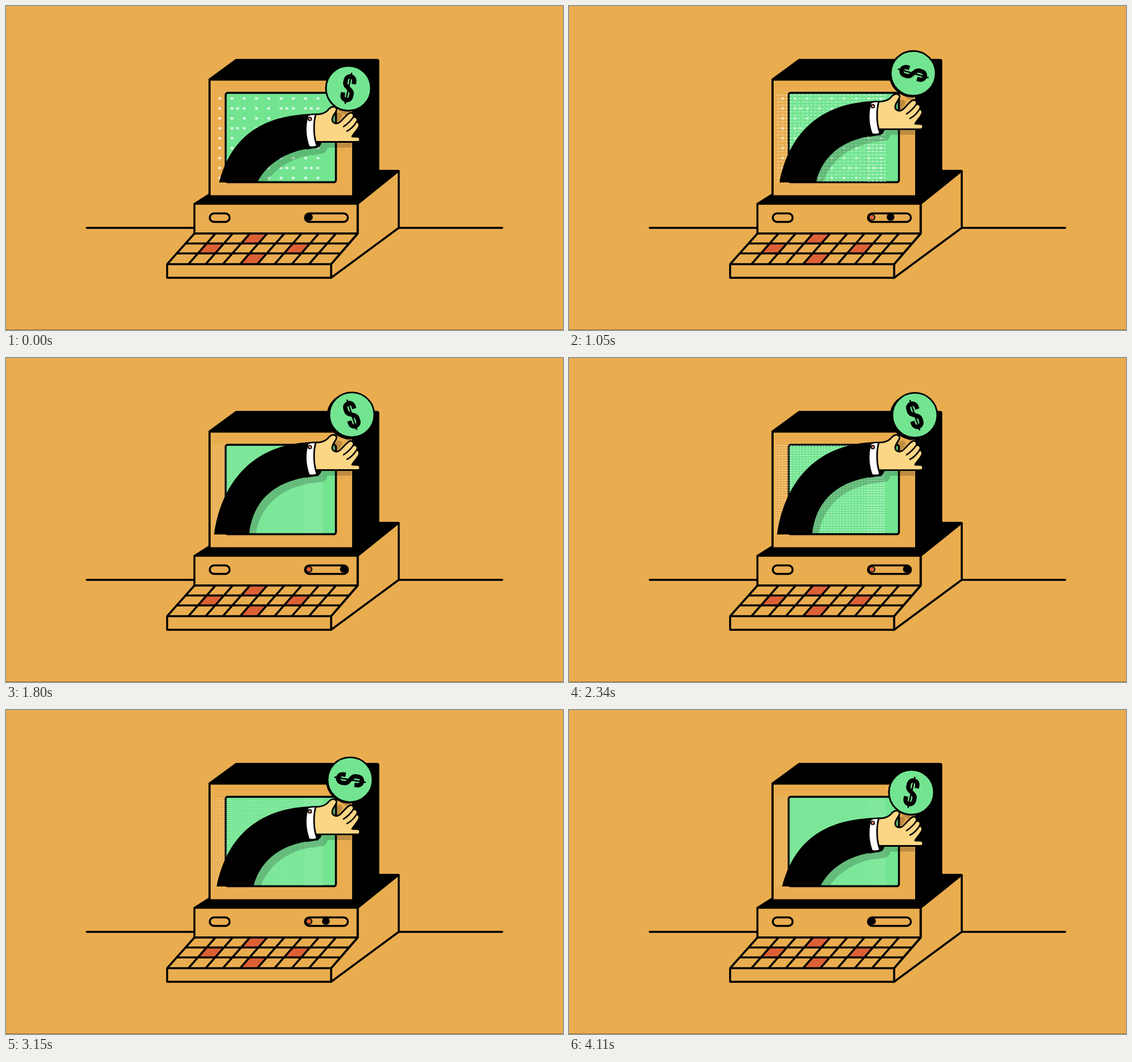
An HTML page for the animation above (4.14 s loop, 980 by 571 pixels).

```html
<!DOCTYPE html>
<html lang="en">
<head>
<meta charset="utf-8">
<title>Computer payment</title>
<style>
  html, body { margin: 0; width: 100%; height: 100%; overflow: hidden; background: #e9ad4f; }
  svg { display: block; width: 980px; height: 571px; }
  .line { fill: none; stroke: #000; stroke-width: 3.5; stroke-linecap: round; stroke-linejoin: round; }
  .face { fill: #e9ad4f; }
  .green { fill: #73e591; }
  .red { fill: #dd6035; }
  .skin { fill: #fbd684; }
  .dash { fill: none; stroke: #fff; }
</style>
</head>
<body>
<svg viewBox="0 0 980 571">
  <defs>
    <clipPath id="front"><path d="M360 132H608V310H360Z"/></clipPath>
    <clipPath id="dots"><path d="M363 153H557V310H363Z"/></clipPath>
    <clipPath id="band"><path d="M524 154H557V310H524Z"/></clipPath>
    <path id="palm" d="M545 191C553 191 561 189 566 184C571 177 579 175 581.500 181C583 186 575 191 574 199C573 207 582 209 587 205C593 200 599 191 605 188.500C610 187 613 191 611 196C616 194 620 199 617 204C622 205 623 211 619 216C615 222 611 226 609 230L619 230.500C624 231 624 239 619 239.500L545 239.500C541 225 541 205 545 191Z"/>
    <path id="sleeve" d="M528 192L545 190V238H556Q554 249 546 250L528 253Z"/>
  </defs>

  <rect y="570" width="980" height="1" fill="#8a6d3c"/>
  <path class="line" d="M142 391H331M691 391H873"/>

  <!-- monitor and base -->
  <path class="line" style="fill:#000" d="M358 129.500L405 95H653Q655 95 655 97V290.500H690L618 348.500H332L358 332Z"/>
  <path class="face" d="M360 131.500H609V333.500H360Z"/>
  <path class="line face" d="M619 348.500L691 290.500V391L572 479V455L619 401Z"/>
  <path class="line face" d="M331.500 348.500H618.500V401H331.500Z"/>
  <rect class="line" x="358.500" y="365.500" width="35" height="15" rx="7.500"/>
  <rect class="line" x="526" y="365.500" width="75.500" height="15" rx="7.500"/>
  <circle class="red" cx="533" cy="372.500" r="5" stroke="#000" stroke-width="2"/>
  <circle id="knob" cy="372" r="6.800"/>

  <!-- keyboard -->
  <path class="face" d="M331.500 401H618.500L572 455V479H283.500V455Z"/>
  <g id="reds" class="red"></g>
  <path id="keys" class="line"/>
  <path class="line" d="M331.500 401H618.500L572 455H283.500ZM283.500 455V479H572V455"/>

  <!-- screen -->
  <rect class="line green" style="fill:#73e591" x="386.500" y="153" width="194" height="157.500" rx="3.500"/>
  <g clip-path="url(#dots)">
    <path id="bold" class="dash" stroke-width="4" stroke-dasharray="5 16.600"/>
    <path id="extra" class="dash" stroke-width="4"/>
    <path id="fine" class="dash"/>
    <path id="dense" class="dash" clip-path="url(#band)"/>
  </g>

  <g clip-path="url(#front)">
    <g opacity=".19" transform="translate(10 10)">
      <path id="armShade"/>
      <g class="lift"><use href="#palm"/><use href="#sleeve"/></g>
      <circle class="coinAt" r="40"/>
    </g>
  </g>

  <!-- arm, coin and hand -->
  <path id="arm"/>
  <circle id="coinBack" r="41"/>
  <g class="coinAt">
    <circle class="green" r="39.500" stroke="#000" stroke-width="2.800"/>
    <g id="dollar" fill="none" stroke="#000">
      <path stroke-width="7.600" d="M7.500 -9V-13C7.500 -24 -7.500 -24 -7.500 -13V-9C-7.500 0 7.500 0 7.500 9V13C7.500 24 -7.500 24 -7.500 13V9"/>
      <path stroke-width="2.600" d="M0 -28V28"/>
    </g>
  </g>
  <g class="lift">
    <use href="#sleeve"/>
    <path d="M531 193Q537 190 546 191Q539 220 547 247Q540 250 533 248Q523 220 531 193Z" fill="#fff" stroke="#000" stroke-width="2.500"/>
    <use href="#palm" class="skin" stroke="#000" stroke-width="2.800" stroke-linejoin="round"/>
    <path class="line" style="stroke-width:2.600" d="M611 196C606 203 601 208 594 212.500M617 204C612 212 607 217 600 220.500"/>
    <circle class="red" cx="534.500" cy="199" r="3" style="fill:#dd8070" stroke="#000" stroke-width="1.700"/>
  </g>
</svg>
<script>
const LOOP = 4140, COL = 21.6, ROW = 17.5;
const $ = id => document.getElementById(id);
const all = (sel, fn) => document.querySelectorAll(sel).forEach(fn);
const set = (id, attrs) => { for (const k in attrs) $(id).setAttribute(k, attrs[k]); };
const mix = (a, b, k) => a + (b - a) * k;

// keyboard: sheared grid, first key wider than the rest
const rowY = [401, 418.5, 436, 455];
const keyX = (k, y) => 368.5 + 30.3 * k - (y - 401) * 0.88;
let lines = 'M316 418.500H603M300.500 436H588';
for (let k = 0; k < 8; k++) lines += `M${keyX(k, 401)} 401L${keyX(k, 455)} 455`;
set('keys', { d: lines });
$('reds').innerHTML = [[0, 2], [1, 0], [1, 5], [2, 3]].map(([r, k]) => {
  const a = rowY[r], b = rowY[r + 1];
  return `<path d="M${keyX(k, a)} ${a}H${keyX(k + 1, a)}L${keyX(k + 1, b)} ${b}H${keyX(k, b)}Z"/>`;
}).join('');

// screen dashes: rows of a grid split into n parts per cell
function rows(n) {
  let d = '';
  for (let y = 163 - ROW; y < 312; y += ROW / n) d += `M351.900 ${y.toFixed(2)}H575`;
  return d;
}
set('bold', { d: rows(1) });
set('extra', {
  d: [1, 3, 7].map(r => [405, 491.500, 534.500].map(x => `M${x} ${163 + r * ROW}h5`).join('')).join('')
});

// time, splits per cell, fine alpha, bold alpha, band alpha
const looks = [
  [0, 1, 0, 0.75, 0], [600, 7, 0.38, 0, 0.1], [1050, 3, 0.42, 0.5, 0.3], [1800, 7, 0.35, 0, 0.2],
  [2340, 4, 0.5, 0, 0.3], [3150, 5, 0.42, 0, 0.25], [LOOP, 7, 0.35, 0, 0.1]
];
let lastN = 0;
function drawDots(t) {
  const i = looks.findIndex(l => l[0] > t), a = looks[i - 1], b = looks[i];
  const k = (t - a[0]) / (b[0] - a[0]);
  const [, split, fine, bold, band] = a.map((v, j) => mix(v, b[j], k));
  const n = Math.round(split);
  if (n !== lastN) {
    const pitch = COL / n, w = Math.min(5, pitch * 0.6), h = Math.min(4, ROW / n * 0.32), d = rows(n);
    set('fine', { d, 'stroke-width': h, 'stroke-dasharray': `${w} ${pitch - w}` });
    set('dense', { d, 'stroke-width': h, 'stroke-dasharray': `${pitch * 0.85} ${pitch * 0.15}` });
    lastN = n;
  }
  set('fine', { opacity: fine });
  set('dense', { opacity: band });
  set('bold', { opacity: bold });
  set('extra', { opacity: bold });
}

// low and raised arm: outer edge upward, then inner edge back down
const low = [375, 311, 395, 235, 445, 192, 541, 190, 548, 250, 500, 252, 460, 275, 442, 311];
const high = [366, 311, 378, 225, 430, 150, 541, 148, 550, 208, 475, 212, 434, 250, 428, 311];
function armPath(k) {
  const v = low.map((n, i) => mix(n, high[i], k).toFixed(2));
  return `M${v.slice(0, 2)}C${v.slice(2, 8)}L${v.slice(8, 10)}C${v.slice(10)}Z`;
}

function draw(t) {
  const a = t / LOOP * 2 * Math.PI;
  const p = (1 - Math.cos(a)) / 2;
  const dy = -43.8 * p;
  const x = 602.5 + 6.2 * p;
  const y = 199 + dy - 56 + 1.2 * Math.cos(a) - Math.sin(a) + 0.8 * Math.cos(2 * a);
  const d = armPath(p / 0.959);

  set('knob', { cx: 533 + 64 * p });
  set('arm', { d });
  set('armShade', { d });
  all('.lift', el => el.setAttribute('transform', `translate(0 ${dy})`));
  all('.coinAt', el => el.setAttribute('transform', `translate(${x} ${y})`));
  set('coinBack', { cx: x - 3.5 * p, cy: y + 2.5 * p });
  set('dollar', { transform: `rotate(${12 + 155 * Math.pow(p, 0.75)})` });
  drawDots(t);
}

const start = performance.now();
function tick() {
  draw((performance.now() - start) % LOOP);
  requestAnimationFrame(tick);
}
tick();
</script>
</body>
</html>
```
